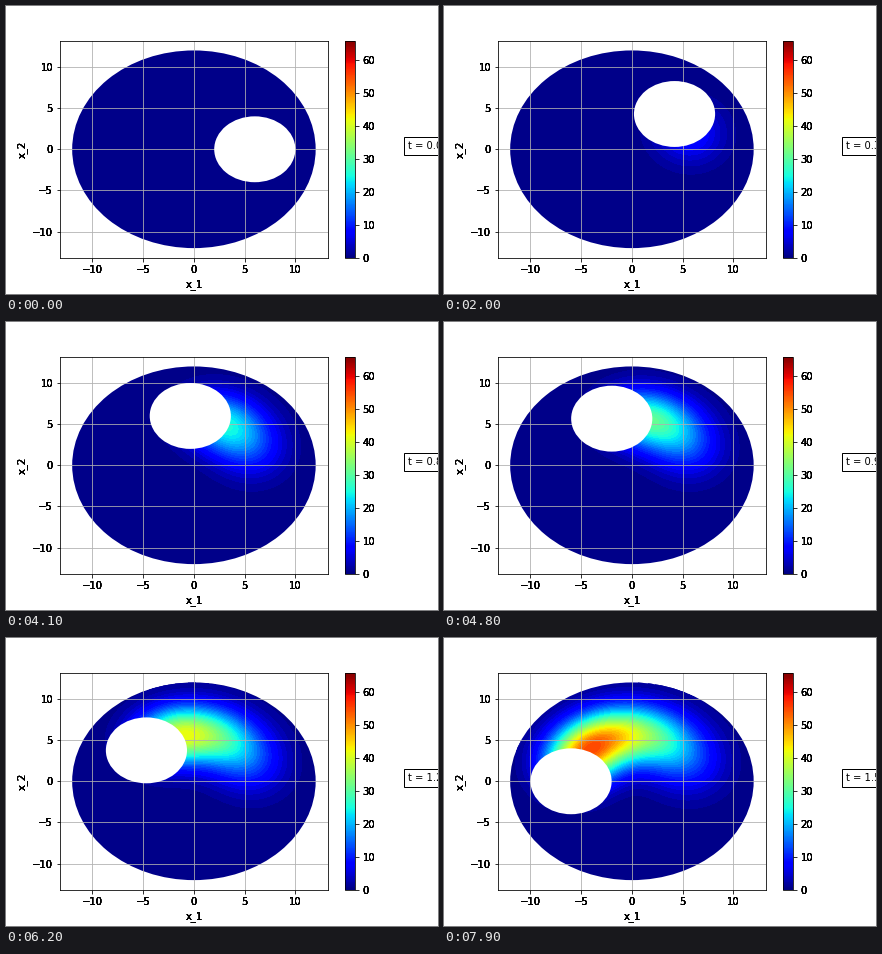
A matplotlib script that plays this animation: 432x288 px, repeating every 8000 ms.

```python
import numpy as np
import matplotlib.pyplot as plt
from matplotlib.animation import FuncAnimation
from matplotlib.cm import ScalarMappable
from matplotlib.colors import Normalize
from matplotlib.patches import Circle

FRAMES = 80
V_MAX = 66
R_OUT, R_HOLE, R_PATH = 12, 4, 6
LAG = 1 / R_PATH        # deposit trails the hole centre by this angle
SIGMA2 = 5.3            # initial spread of the deposited heat
SPREAD = 0.02           # growth of the spread per frame
STEP = np.pi / (FRAMES - 1)

axis = np.linspace(-12.2, 12.2, 150)
X, Y = np.meshgrid(axis, axis)
levels = np.linspace(0, V_MAX, 51)


def heat(i):
    """Heat left behind along the arc up to frame i."""
    u = np.zeros_like(X)
    front = i * STEP - LAG
    if front <= 0:
        return u
    n = max(4, int(front * 22))
    ds = R_PATH * front / n
    for a in (np.arange(n) + 0.5) * front / n:
        s2 = SIGMA2 + SPREAD * (front - a) / STEP
        peak = 10 + 0.37 * np.degrees(a)
        weight = peak * ds * np.sqrt(SIGMA2 / (2 * np.pi)) / s2
        d2 = (X - R_PATH * np.cos(a))**2 + (Y - R_PATH * np.sin(a))**2
        u += weight * np.exp(-d2 / (2 * s2))
    return np.clip(u, 0, V_MAX - 0.01)


def harden(text, times=6):
    """Draw a text several times so its soft edges turn solid."""
    draw = text.draw

    def repeat(renderer):
        for _ in range(times):
            draw(renderer)
    text.draw = repeat


plt.rcParams.update({"font.family": "DejaVu Sans", "font.size": 10})
fig = plt.figure(figsize=(6, 4), dpi=72, facecolor="white")
fig.subplots_adjust(left=0.125, right=0.9, bottom=0.125, top=0.88)
ax = fig.add_subplot()
bar = fig.colorbar(ScalarMappable(Normalize(0, V_MAX), "jet"), ax=ax,
                   ticks=range(0, 61, 10))

ax.set(xlim=(-13.2, 13.2), ylim=(-13.2, 13.2), xlabel="x_1", ylabel="x_2",
       xticks=range(-10, 11, 5), yticks=range(-10, 11, 5))
ax.grid(True)
for text in (ax.get_xticklabels() + ax.get_yticklabels()
             + bar.ax.get_yticklabels() + [ax.xaxis.label, ax.yaxis.label]):
    harden(text)

rim = Circle((0, 0), R_OUT, transform=ax.transData)
hole = ax.add_patch(Circle((R_PATH, 0), R_HOLE, fc="white", ec="none", zorder=2.2))
clock = ax.text(1.3, 0.5, "", transform=ax.transAxes,
                bbox=dict(facecolor="white", pad=4))
field = None


def update(i):
    global field
    if field is not None:
        field.remove()
    field = ax.contourf(X, Y, heat(i), levels, cmap="jet", vmin=0, vmax=V_MAX)
    field.set_clip_path(rim)
    a = i * STEP
    hole.center = R_PATH * np.cos(a), R_PATH * np.sin(a)
    clock.set_text(f"t = {a / 2:.3f}")


anim = FuncAnimation(fig, update, frames=FRAMES, init_func=lambda: None,
                     interval=100, repeat=True, repeat_delay=0)
plt.show()
```
